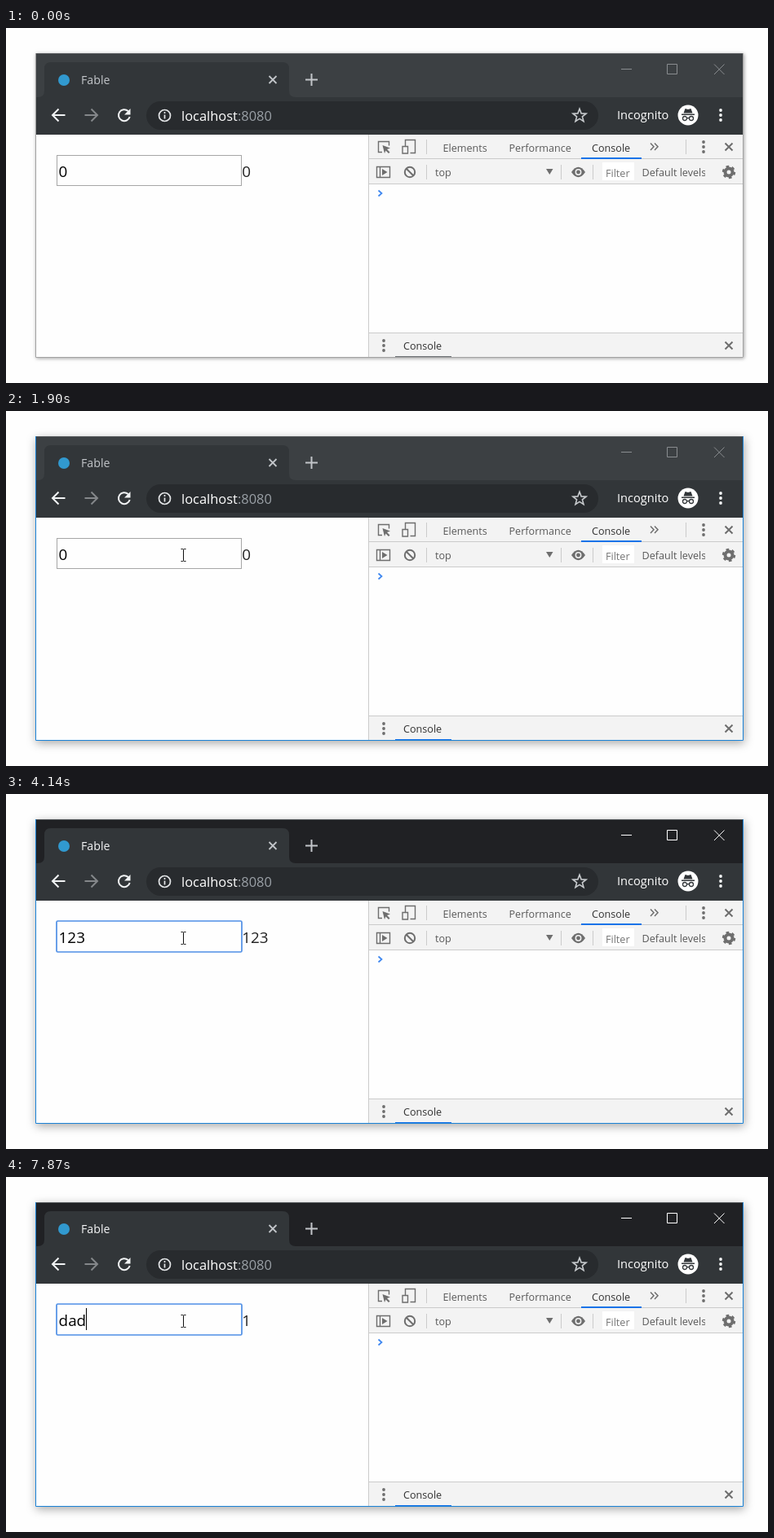
An HTML page for the animation above (8 s loop, 934 by 436 pixels).

```html
<!DOCTYPE html>
<html lang="en">
<head>
<meta charset="utf-8">
<title>Number input</title>
<style>
  html, body { margin: 0; width: 100%; height: 100%; overflow: hidden; background: #fefefe; }
  svg { display: block; width: 934px; height: 436px; }
  text { font-family: "Open Sans", "Noto Sans", sans-serif; white-space: pre; }
  .page { font-size: 18.85px; }
  .tool { font-size: 12.6px; fill: #5a5a5a; }
  .line { fill: none; }
  #frame { filter: drop-shadow(1px 1px 2px rgba(0,0,0,.32)) drop-shadow(0 0 3px rgba(0,0,0,.06)); }
  .active #frame { filter: drop-shadow(1px 3px 6px rgba(0,0,0,.34)); }
  #border { stroke: #a2a2a2; }
  .active #border { stroke: #1a82d6; }
  #drawerMark { fill: #6e7276; }
  .active #drawerMark { fill: #1a73e8; }
  #strip { fill: #3c4043; }
  #controls { stroke: #8a8d90; }
  #tabTitle { fill: #c3c6ca; }
  .lit #strip { fill: #202124; }
  .lit #controls { stroke: #fff; }
  .lit #tabTitle { fill: #f4f5f6; }
  #box { stroke: #a6a6a6; }
  #ring { display: none; }
  .focus #ring { display: inline; }
  .focus #box { display: none; }
</style>
</head>
<body>
<svg id="stage" viewBox="0 0 934 436">
  <rect width="934" height="436" fill="#fefefe"/>
  <rect id="frame" x="36" y="31" width="868" height="374" fill="#fefefe"/>

  <!-- tab strip -->
  <rect id="strip" x="37" y="31" width="866" height="55"/>
  <path fill="#323639" d="M37 85H39Q47 85 47 77V50Q47 42 55 42H339Q347 42 347 50V77Q347 85 355 85H903V131H37Z"/>
  <circle cx="71" cy="64" r="7" fill="#3199cf"/>
  <text id="tabTitle" x="92" y="69" font-size="14.2">Fable</text>
  <g class="line" stroke="#c2c5c9" stroke-width="1.8">
    <path d="M322.5 59l9 9M331.5 59l-9 9"/>
    <path d="M367 63.5h15M374.5 56v15" stroke-width="2"/>
  </g>
  <path id="controls" class="line" d="M754 50.5h13M810.5 44.5h12v12h-12zM868 44.5l12.5 12.5M880.5 44.5L868 57"/>

  <!-- toolbar -->
  <g class="line" stroke="#f1f3f4" stroke-width="2">
    <path d="M72.5 107H58M64.5 99.5L57 107l7.500 7.500"/>
    <path d="M96.500 107H111M104.500 99.500L112 107l-7.500 7.500" stroke="#84878a"/>
    <path d="M149.700 102A7 7 0 1 0 151.700 109"/>
  </g>
  <path d="M152.500 99v7.500H145z" fill="#f1f3f4"/>
  <rect x="172" y="90" width="554" height="35" rx="17.500" fill="#282b2e"/>
  <g class="line" stroke="#e4e6e8" stroke-width="1.7">
    <circle cx="194.500" cy="107.500" r="7"/>
    <path d="M194.500 106.500v5M194.500 103v2"/>
  </g>
  <text x="215" y="114" font-size="16.46" fill="#fff">localhost<tspan fill="#9aa0a6">:8080</tspan></text>
  <path id="star" class="line" stroke="#c8cbce" stroke-width="1.6"/>
  <text x="749" y="112" font-size="14.6" fill="#fff">Incognito</text>
  <circle cx="836" cy="107" r="12.500" fill="#fff"/>
  <path fill="#323639" d="M828 105.500h16v1.500h-16zM830.500 104.500l2-5.500 3.500 1 3.500-1 2 5.500z"/>
  <path class="line" stroke="#323639" stroke-width="1.300" d="M834.500 111a2.500 2.500 0 1 0-5 0a2.500 2.500 0 1 0 5 0q1.500-1 3 0a2.500 2.500 0 1 0 5 0a2.500 2.500 0 1 0-5 0"/>

  <!-- developer panel -->
  <path fill="#f3f3f3" d="M445 131h458v60H445zM445 375h458v29H445z"/>
  <path class="line" stroke="#cbcbcb" d="M444.500 131v273M445 160.500h458M445 191.500h458M445 374.500h458M515.500 137v18M833.500 137v18M515.500 168v18M680.500 168v18M719.500 168v18"/>
  <rect x="705" y="159" width="74" height="2" fill="#1a73e8"/>
  <rect id="drawerMark" x="477" y="403" width="69" height="2"/>
  <rect x="731" y="165" width="39" height="22" fill="#fff"/>
  <g class="tool">
    <text x="535.500" y="152">Elements</text>
    <text x="616.500" y="152">Performance</text>
    <text x="718" y="152" fill="#333">Console</text>
    <text x="526" y="182">top</text>
    <text x="735" y="183" fill="#757575">Filter</text>
    <text x="779.500" y="182" clip-path="url(#levels)">Default levels</text>
    <text x="487" y="395" fill="#333">Console</text>
  </g>
  <clipPath id="levels"><rect x="775" y="165" width="82" height="24"/></clipPath>
  <g class="line" stroke="#6e6e6e" stroke-width="1.400">
    <path d="M461 152.500h-4.500v-13h13v5"/>
    <path d="M489.500 145v-7.500h12v16h-6M486 145.500h6.500v8.500H486z"/>
    <path d="M454.500 170.500h16v13h-16zM458.500 170.500v13"/>
    <path d="M490.500 172.500l9 9" stroke-width="2"/>
    <circle cx="495" cy="177" r="6.200" stroke-width="2"/>
    <path d="M790 141.500l4 4.200-4 4.200M795 141.500l4 4.200-4 4.200" stroke-width="1.500"/>
    <path d="M881.500 141.500l9 9M890.500 141.500l-9 9M881.500 385.500l9 9M890.500 385.500l-9 9" stroke-width="2"/>
    <circle cx="886" cy="177" r="4.500" stroke-width="4"/>
    <circle cx="886" cy="177" r="7" stroke-width="2.400" stroke-dasharray="3.665"/>
  </g>
  <g fill="#6e6e6e">
    <path d="M461.500 144l9.500 3.500-4 1.500 3.500 3.500-1.500 1.500-3.500-3.500-1.500 3.500z"/>
    <path d="M461 173l6.500 4-6.500 4zM662 173h8.500l-4.200 7z"/>
    <path d="M693 177q8.500-12.500 17 0q-8.500 12.500-17 0z"/>
  </g>
  <circle cx="701.500" cy="177" r="3.200" fill="#6e6e6e" stroke="#f3f3f3" stroke-width="1.500"/>
  <g id="dots"></g>
  <path class="line" stroke="#3d86f0" stroke-width="1.700" d="M456.500 199.500l4 3.500-4 3.500"/>
  <path id="border" class="line" d="M36.500 31V404.500H903.500V31"/>
  <path class="line" stroke="#55585b" d="M37 31.500h866"/>

  <!-- page -->
  <rect id="box" class="line" x="62.500" y="156.500" width="226" height="37"/>
  <rect id="ring" class="line" x="62" y="156" width="227" height="38" rx="1.500" stroke="#4f8fe6" stroke-width="1.700"/>
  <text id="value" class="page" x="64.6" y="183" fill="#000"></text>
  <text id="output" class="page" x="289.200" y="183" fill="#222"></text>
  <rect id="caret" y="161" width="1" height="27"/>

  <path id="arrow" fill="#fff" stroke="#111" d="M.5.5V16.500L4.300 13l2.500 5.500 2.500-1-2.500-5.500H11.500Z"/>
  <path id="beam" class="line" stroke="#111" d="M-3 -7.500H-1Q0 -7.500 0 -6.500Q0 -7.500 1 -7.500H3M0 -6.500V6.500M-3 7.500H-1Q0 7.500 0 6.500Q0 7.500 1 7.500H3"/>
</svg>
<script>
const LOOP = 8000;
const $ = id => document.getElementById(id);
const stage = $('stage');

// time, input text, echoed number, caret visible
const typing = [
  [0, '0', '0', 0], [2030, '0', '0', 1],
  [2470, '1', '1', 1], [2710, '12', '12', 1], [2900, '123', '123', 1],
  [3120, '1234', '1234', 1], [3620, '1234', '1234', 0],
  [4140, '123', '123', 0], [4240, '123', '123', 1], [4410, '12', '12', 1],
  [4670, '1', '1', 0], [4750, '1', '1', 1], [5250, '1', '1', 0],
  [5420, '', '1', 1], [5760, '', '1', 0], [6280, '', '1', 1],
  [6370, 'd', '1', 1], [6470, 'da', '1', 1], [6570, 'dad', '1', 1],
  [6660, 'dadad', '1', 1], [6760, 'dadadw', '1', 1], [6850, 'dadadwa', '1', 1],
  [7350, 'dadadwa', '1', 0], [7430, 'dadadw', '1', 0], [7570, 'dadad', '1', 0],
  [7710, 'dada', '1', 0], [7790, 'dad', '1', 0], [7870, 'dad', '1', 1]
];

const lerp = (a, b, p) => a + (b - a) * p;
const easeOut = p => 1 - (1 - p) ** 2;
const smooth = p => p * p * (3 - 2 * p);
const show = (el, on) => { el.style.display = on ? 'inline' : 'none'; };

function drawStar() {
  const points = Array.from({ length: 10 }, (_, i) => {
    const r = i % 2 ? 3.6 : 8.5, a = (i / 5 - .5) * Math.PI;
    return [703 + r * Math.cos(a), 107.8 + r * Math.sin(a)].map(v => v.toFixed(2));
  });
  $('star').setAttribute('d', 'M' + points.join('L') + 'Z');
}

function drawDots(x, y, fill) {
  for (const dy of [-6, 0, 6])
    $('dots').innerHTML += `<circle cx="${x}" cy="${y + dy}" r="1.9" fill="${fill}"/>`;
}

function pointerAt(t) {
  if (t < 230) return null;
  if (t < 1080) {
    const p = easeOut(Math.min(11, Math.floor((t - 230) / 68.1)) / 11);
    return [lerp(670, 368, p), lerp(415, 276, p)];
  }
  const p = smooth(Math.min(13, Math.floor((t - 1080) / 60) + 1) / 13);
  return [lerp(368, 217.5, p), lerp(276, 177.5, p)];
}

function placePointer(t) {
  const at = pointerAt(t);
  const overInput = at && at[0] < 289 && at[1] < 194;
  show($('arrow'), at && !overInput);
  show($('beam'), overInput);
  if (!at) return;
  const x = Math.floor(at[0]), y = Math.floor(at[1]);
  $('arrow').setAttribute('transform', `translate(${x} ${y})`);
  $('beam').setAttribute('transform', `translate(${x + .5} ${y})`);
}

function render(t) {
  stage.classList.toggle('active', t >= 1900);
  stage.classList.toggle('lit', t >= 1930);
  stage.classList.toggle('focus', t >= 2030);

  const [, text, echo, caretOn] = typing.filter(step => step[0] <= t).pop();
  $('value').textContent = text;
  $('output').textContent = echo;
  show($('caret'), caretOn);
  const width = text ? $('value').getComputedTextLength() : 0;
  $('caret').setAttribute('x', Math.max(65, Math.floor(64.6 + width)));
  placePointer(t);
}

drawStar();
drawDots(876, 107, '#f1f3f4');
drawDots(855, 146, '#6e6e6e');
drawDots(463, 390, '#6e6e6e');

const start = performance.now();
function tick() {
  render((performance.now() - start) % LOOP);
  requestAnimationFrame(tick);
}
tick();
</script>
</body>
</html>
```
